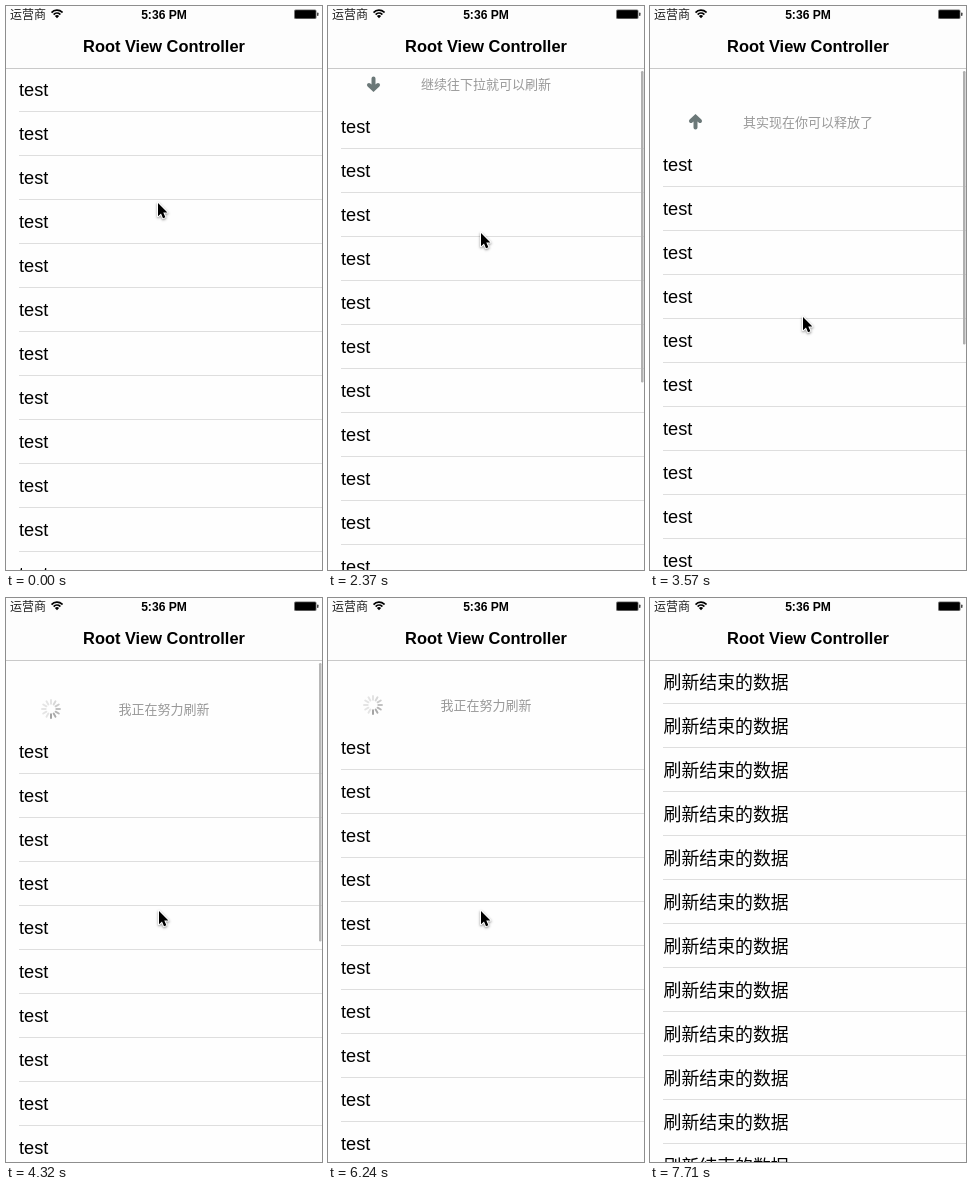
Animation of 316x564 px, one loop 8.5 s. Source, as an HTML page with a canvas:

```html
<!DOCTYPE html>
<html lang="zh">
<head>
<meta charset="utf-8">
<title>Pull to refresh</title>
<style>
html, body { margin: 0; width: 100%; height: 100%; overflow: hidden; background: #fefefe; }
canvas { display: block; }
</style>
</head>
<body>
<canvas id="stage" width="316" height="564"></canvas>
<script>
const W = 316, H = 564, LOOP = 8500, STEP = 148.2, START = 296;
const ctx = document.getElementById('stage').getContext('2d');
const LATIN = '"Liberation Sans", Arial, sans-serif';
const CJK = '"Noto Sans CJK SC", "Noto Sans CJK", sans-serif';

// Keyframes as [step, value]; one step is one redraw of the screen.
const pull = [[8, 0], [9, 1], [10, 3], [14, 37], [16, 48], [22, 75], [24, 77], [26, 77],
  [27, 70], [28, 66], [41, 66], [42, 43], [43, 0]];
const cursorX = [[-1, 152], [5, 153], [10, 154], [14, 153], [45, 153], [47, 189], [49, 260], [50, 275]];
const cursorY = [[-1, 197], [0, 193], [3, 159], [5, 145], [8, 145], [9, 152], [10, 161], [14, 227],
  [16, 252], [22, 311], [24, 313], [45, 313], [47, 390], [49, 546], [50, 585]];
const barAlpha = [[8, 0], [9, 1], [26, 1], [27, .9], [28, .45], [29, .1], [30, 0]];
const arrowTurn = [[19, 0], [21, Math.PI], [41, Math.PI], [42, 0]];

function at(keys, k) {
  const i = keys.findIndex(([s]) => s >= k);
  if (i < 0) return keys[keys.length - 1][1];
  if (i === 0) return keys[0][1];
  const [k0, v0] = keys[i - 1], [k1, v1] = keys[i];
  return v0 + (v1 - v0) * (k - k0) / (k1 - k0);
}

function text(str, x, y, font, color = '#000', align = 'left') {
  ctx.font = font;
  ctx.fillStyle = color;
  ctx.textAlign = align;
  ctx.fillText(str, x, y);
}

function rect(x, y, w, h, color, r = 0) {
  ctx.fillStyle = color;
  ctx.beginPath();
  ctx.roundRect(x, y, w, h, r);
  ctx.fill();
}

function rows(off, done) {
  for (let i = 0; i < 12; i++) {
    const y = off + 44 * i;
    if (done) text('刷新结束的数据', 13.5, y + 90.5, '300 17.9px ' + CJK);
    else text('test', 13, y + 90, '18.2px ' + LATIN);
    rect(13, y + 105, W - 13, 1, '#dedede');
  }
}

function arrow(y, turn) {
  ctx.save();
  ctx.translate(45.5, y);
  ctx.rotate(turn);
  ctx.strokeStyle = '#6b7878';
  ctx.lineWidth = 4;
  ctx.lineCap = 'round';
  ctx.stroke(new Path2D('M0-5.5V4M-4.5 1L0 5.3L4.5 1'));
  ctx.restore();
}

function spinner(y, k) {
  const head = Math.round(10 + (k - 29) * STEP / 1000 * 12);
  ctx.save();
  ctx.translate(45, y);
  ctx.lineWidth = 1.9;
  ctx.lineCap = 'round';
  for (let i = 0; i < 12; i++) {
    const age = ((head - i) % 12 + 12) % 12;
    const g = Math.min(228, 160 + age * 11);
    ctx.strokeStyle = `rgb(${g},${g},${g})`;
    ctx.save();
    ctx.rotate(i * Math.PI / 6);
    ctx.stroke(new Path2D('M0-5.3V-9'));
    ctx.restore();
  }
  ctx.restore();
}

function header(off, k) {
  const busy = k >= 27 && k < 42, y = off + 41;
  const label = busy ? '我正在努力刷新'
    : k >= 20 && k < 27 ? '其实现在你可以释放了' : '继续往下拉就可以刷新';
  text(label, 158, y + 4.7, '300 13px ' + CJK, '#999', 'center');
  if (busy) spinner(y, k);
  else arrow(y, at(arrowTurn, k));
}

function navBar() {
  rect(0, 0, W, 62, '#fdfdfd');
  rect(0, 62, W, 1, '#c9c9c9');
  text('运营商', 4, 12.6, '12px ' + CJK, '#222');
  text('5:36 PM', 158, 12.5, 'bold 12.1px ' + LATIN, '#000', 'center');
  text('Root View Controller', 158, 46, 'bold 16.4px ' + LATIN, '#000', 'center');

  ctx.strokeStyle = '#000';
  ctx.lineWidth = 1.7;
  ctx.lineCap = 'butt';
  for (const r of [4.6, 7.5]) {
    ctx.beginPath();
    ctx.arc(51, 11.7, r, -Math.PI * .76, -Math.PI * .24);
    ctx.stroke();
  }
  ctx.fillStyle = '#000';
  ctx.fill(new Path2D('M51 12.2L48.9 9.9Q51 8.2 53.1 9.9Z'));

  rect(288, 3.5, 22.5, 9.5, '#777', 1.5);
  rect(289, 4.3, 20.7, 7.9, '#000', 1);
  rect(311, 6.5, 1.5, 3.5, '#444', .7);
}

function cursor(x, y) {
  const shape = new Path2D('M0 0V13.2L3 10.4L5 15.2L7.4 14.2L5.3 9.5H9.4Z');
  ctx.save();
  ctx.translate(x, y);
  ctx.shadowColor = 'rgba(0,0,0,.45)';
  ctx.shadowBlur = 2.5;
  ctx.shadowOffsetY = 1;
  ctx.strokeStyle = '#fff';
  ctx.lineWidth = 2;
  ctx.lineJoin = 'round';
  ctx.stroke(shape);
  ctx.shadowColor = 'transparent';
  ctx.fillStyle = '#000';
  ctx.fill(shape);
  ctx.restore();
}

function draw(now) {
  const k = Math.floor((now % LOOP - START) / STEP);
  const off = Math.round(at(pull, k));
  rect(0, 0, W, H, '#fefefe');
  rows(off, k >= 42);
  if (off > 0) header(off, k);
  navBar();

  ctx.globalAlpha = at(barAlpha, k);
  const bottom = k < 28 ? 413.5 - off : 386;
  rect(313, 65, 2.5, bottom - 65, '#b0b0b0', 1.2);
  ctx.globalAlpha = 1;

  cursor(at(cursorX, k), at(cursorY, k));
  requestAnimationFrame(() => draw(performance.now()));
}
draw(performance.now());
</script>
</body>
</html>
```
